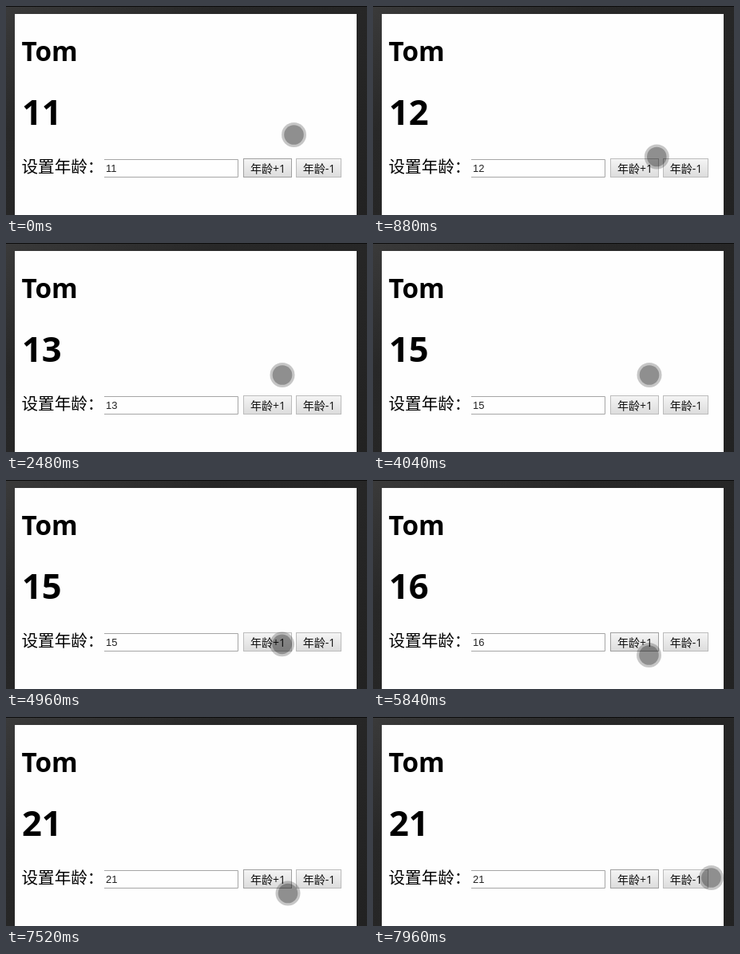
These frames come from a looping animation (452 px wide and 262 px high, 8 s). An HTML page:

```html
<!DOCTYPE html>
<html lang="zh-CN">
<head>
<meta charset="utf-8">
<style>
  html, body { margin: 0; width: 100%; height: 100%; overflow: hidden; background: #242424; }
  svg { display: block; }
  text { font-family: "Open Sans", "Noto Sans CJK SC", "Noto Sans CJK", sans-serif; fill: #000; }
  .bold { font-weight: 700; }
  .label { font-size: 20.6px; font-weight: 300; }
  .small { font-size: 14px; text-anchor: middle; fill: #111; }
  #field { font: 13px "Liberation Sans", Arial, sans-serif; fill: #222; }
</style>
</head>
<body>
<svg width="452" height="262" viewBox="0 0 452 262">
  <defs>
    <linearGradient id="frame" x1="0" y1="0" x2="1" y2="1">
      <stop offset="0" stop-color="#3a3a3a"/>
      <stop offset=".3" stop-color="#282828"/>
      <stop offset="1" stop-color="#222"/>
    </linearGradient>
    <linearGradient id="face" x1="0" y1="0" x2="0" y2="1">
      <stop offset="0" stop-color="#f5f5f5"/>
      <stop offset="1" stop-color="#dcdcdc"/>
    </linearGradient>
  </defs>
  <rect width="452" height="262" fill="url(#frame)"/>
  <rect width="452" height="1" fill="#0c0c0c"/>
  <rect x="11" y="10" width="428" height="252" fill="#fefefe"/>

  <text class="bold" x="19.5" y="69" font-size="33.3">Tom</text>
  <text class="bold" id="age" x="20" y="148.5" font-size="43.5"></text>
  <text class="label" x="19.5" y="209">设置年龄：</text>

  <path d="M123 192.5H290.5V214.5H123" fill="none" stroke="#a6a6a6"/>
  <text id="field" x="125" y="208"></text>

  <rect id="plus" x="297.5" y="191.5" width="60" height="23" fill="url(#face)"/>
  <text class="small" x="328" y="208.5">年龄+1</text>
  <rect x="363.5" y="191.5" width="56" height="23" fill="url(#face)" stroke="#bcbcbc"/>
  <text class="small" x="392" y="208.5">年龄-1</text>

  <g id="pointer">
    <circle r="15.5" fill-opacity=".22"/>
    <circle r="12.3" fill-opacity=".28"/>
  </g>
</svg>
<script>
  const LOOP = 8000, STEP = 40, FIRST_TICK = 760, PRESS = 160;
  const $ = id => document.getElementById(id);

  const clicks = [5680, 6360, 6520, 7040, 7200, 7360];
  const home = { x: 360.5, y: 161.5 };
  const moves = [
    { at: 560, lasts: 920, x: 349.5, y: 219.5 },
    { at: 2320, lasts: 160, x: 346, y: 165.5 },
    { at: 4720, lasts: 400, x: 345.5, y: 219.5 },
    { at: 7440, lasts: 80, x: 353, y: 221 },
    { at: 7520, lasts: 440, x: 423.5, y: 201.5 }
  ];

  const clamp = (v, min, max) => Math.min(max, Math.max(min, v));
  const easeOut = p => 1 - (1 - p) ** 1.5;

  // A timer adds one each second up to 15, then each click adds one
  function ageAt(t) {
    const ticks = clamp(Math.floor((t - FIRST_TICK) / 1000) + 1, 0, 4);
    return 11 + ticks + clicks.filter(c => c <= t).length;
  }

  function isLit(t) {
    const waiting = t >= FIRST_TICK && t < clicks[0];
    return waiting || clicks.some(c => t >= c && t < c + PRESS);
  }

  function pointerAt(t) {
    return moves.reduce((from, to) => {
      const k = easeOut(clamp((t - to.at) / to.lasts, 0, 1));
      return { x: from.x + (to.x - from.x) * k, y: from.y + (to.y - from.y) * k };
    }, home);
  }

  function draw() {
    const t = Math.floor(((performance.now() - start) % LOOP) / STEP) * STEP;
    const { x, y } = pointerAt(t);
    $("age").textContent = $("field").textContent = ageAt(t);
    $("plus").setAttribute("stroke", isLit(t) ? "#bcbcbc" : "#a0a0a0");
    $("pointer").setAttribute("transform", `translate(${x} ${y})`);
    requestAnimationFrame(draw);
  }

  const start = performance.now();
  draw();
</script>
</body>
</html>
```
